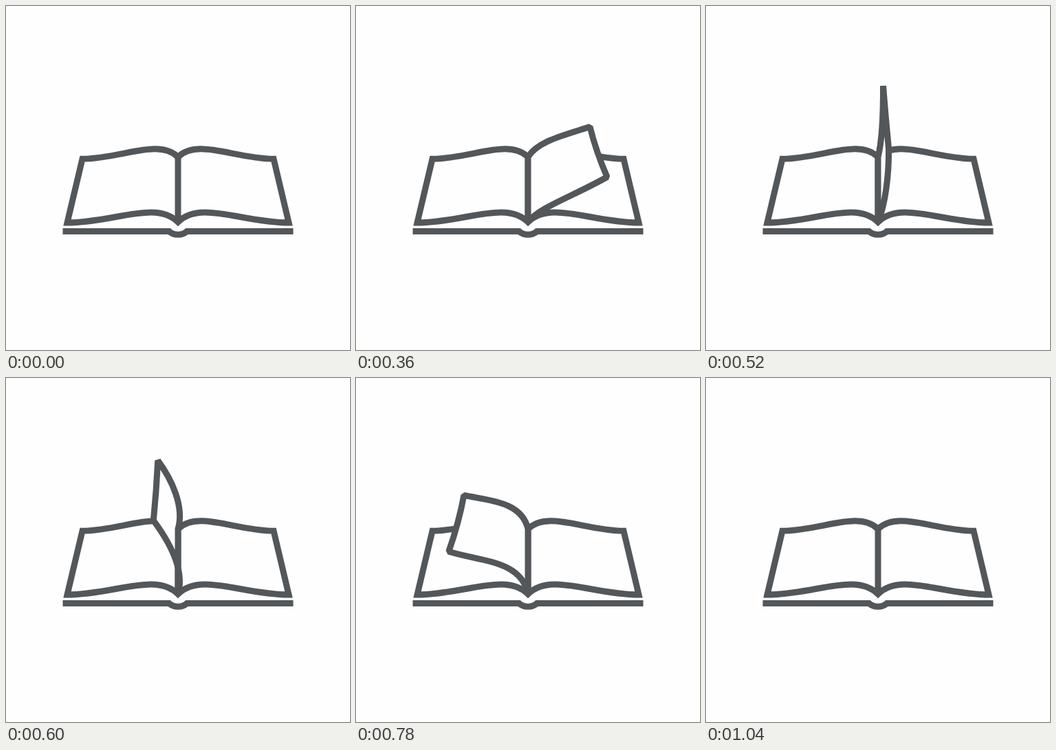
These frames come from a looping animation (500x500 px, 1100 ms). An HTML page:

```html
<!DOCTYPE html>
<html lang="en">
<head>
<meta charset="utf-8">
<title>Book</title>
<style>
  html, body { margin: 0; width: 100%; height: 100%; overflow: hidden; background: #fefefe; }
  svg { display: block; width: 100%; height: 100%; }
  path { fill: none; stroke: #53575a; stroke-width: 9; }
  #page { fill: #fefefe; stroke-linejoin: bevel; }
</style>
</head>
<body>
<svg viewBox="0 0 500 500">
  <path d="M82.5 327.5H237C241 331.5 245 332.2 250 332.2S259 331.5 263 327.5H417.5"/>
  <path id="outline"/>
  <path d="M250 217V315"/>
  <path id="page"/>
</svg>
<script>
const LOOP = 1100, STEP = 20, START = 100, END = 1040;
const SPINE_TOP = [250, 219.5], SPINE_BOTTOM = [250, 314];

// An edge leaves the spine: its corner, its bend near the spine and its curl near the corner.
const edge = (x, y, bend, curl = 0) => [x, y, bend, curl];
const mirror = ([x, y, bend, curl]) => edge(500 - x, y, -bend, -curl);
const restTop = edge(389, 222.3, 0.2), restBottom = edge(411, 315, 0.2);

const pose = (time, top, bottom) => ({ time, values: [...top, ...bottom] });
const poses = [
  pose(START, restTop, restBottom),
  pose(200, restTop, edge(411.5, 295.5, 0.16, -0.06)),
  pose(360, edge(340, 175.5, 0.15, 0.05), edge(365, 248.5, 0.08)),
  pose(520, edge(257.5, 116, -0.04, -0.03), edge(265.5, 207, -0.06, -0.06)),
  pose(680, edge(189, 138.5, -0.28, -0.17), edge(170.5, 220, -0.28, -0.13)),
  pose(900, edge(126, 209, -0.27), edge(104, 294, -0.27)),
  pose(END, mirror(restTop), mirror(restBottom))
];

// Slope of one value at a pose; flat at the ends and next to a hold.
function slope(k, i) {
  const before = poses[k - 1], after = poses[k + 1];
  if (!before || !after) return 0;
  const a = before.values[i], b = poses[k].values[i], c = after.values[i];
  return a === b || b === c ? 0 : (c - a) / (after.time - before.time);
}

function poseAt(time) {
  let k = 0;
  while (time >= poses[k + 1].time) k++;
  const from = poses[k], to = poses[k + 1];
  const span = to.time - from.time, s = (time - from.time) / span;
  const ease = s * s * (3 - 2 * s);
  return from.values.map((v, i) =>
    v + (to.values[i] - v) * ease +
    span * s * (1 - s) * ((1 - s) * slope(k, i) - s * slope(k + 1, i)));
}

// Bezier points of an edge; its handles are set along and across the chord.
function curve([sx, sy], [x, y, bend, curl]) {
  const dx = x - sx, dy = y - sy, pull = Math.abs(curl);
  const handle = (along, across) =>
    [sx + dx * along + dy * across, sy + dy * along - dx * across];
  return [[sx, sy], handle(0.2 + 0.6 * pull, bend), handle(0.57 + pull, curl), [x, y]];
}

const outward = points => `C${points.slice(1)}`;
const inward = points => `C${points.slice(0, 3).reverse()}`;

// The free side of a lifted page bows towards the spine.
function side([x1, y1], [x2, y2]) {
  const lift = Math.min(1, (SPINE_BOTTOM[1] - y2) / 15);
  const bow = 0.03 * lift * (250 - x2);
  return `Q${[(x1 + x2) / 2 + bow, (y1 + y2) / 2]},${[x2, y2]}`;
}

function pagePath(values) {
  const top = curve(SPINE_TOP, values.slice(0, 4));
  const bottom = curve(SPINE_BOTTOM, values.slice(4));
  return `M${SPINE_TOP}${outward(top)}${side(top[3], bottom[3])}${inward(bottom)}Z`;
}

function bookPath() {
  const top = curve(SPINE_TOP, restTop), bottom = curve(SPINE_BOTTOM, restBottom);
  const leftTop = curve(SPINE_TOP, mirror(restTop));
  const leftBottom = curve(SPINE_BOTTOM, mirror(restBottom));
  return `M${SPINE_TOP}${outward(top)}L${bottom[3]}${inward(bottom)}` +
    `${outward(leftBottom)}L${leftTop[3]}${inward(leftTop)}Z`;
}

document.getElementById('outline').setAttribute('d', bookPath());
const page = document.getElementById('page');

function draw(now) {
  const time = Math.floor((now % LOOP) / STEP) * STEP;
  const turning = time > START && time < END;
  page.setAttribute('d', turning ? pagePath(poseAt(time)) : '');
}

const begin = performance.now();
function tick() {
  draw(performance.now() - begin);
  requestAnimationFrame(tick);
}
tick();
</script>
</body>
</html>
```
